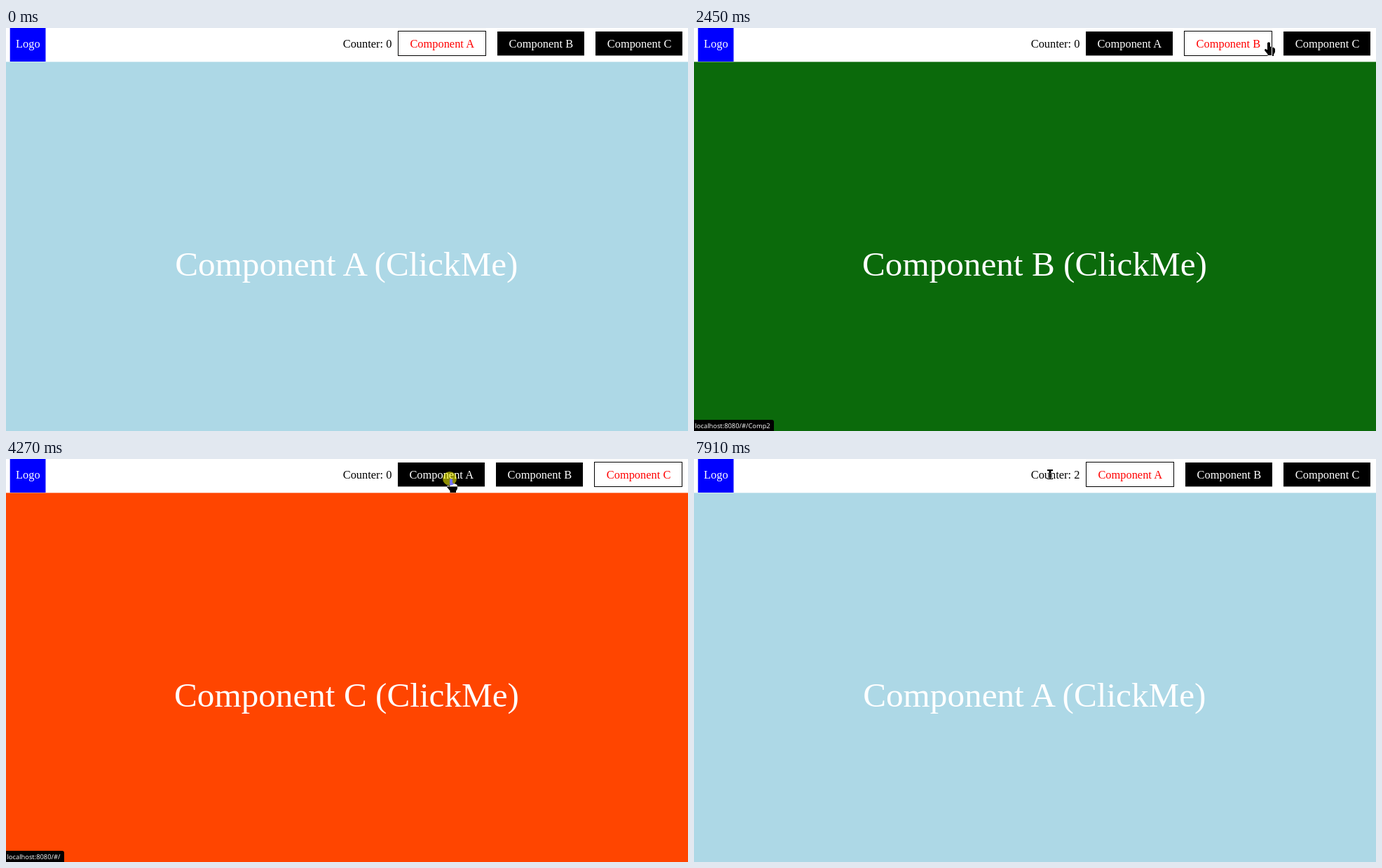
An HTML page with a canvas that plays this animation: 973 by 576 pixels, repeating every 8000 ms.

```html
<!DOCTYPE html>
<html lang="en">
<head>
<meta charset="utf-8">
<title>Component tabs</title>
<style>
  html, body { margin: 0; height: 100%; overflow: hidden; background: #fff; }
  canvas { display: block; }
</style>
</head>
<body>
<canvas id="stage" width="973" height="576"></canvas>
<script>
const ctx = document.getElementById('stage').getContext('2d');
const LOOP = 8000, FADE = 500, EM = 16.4, NAV = 48.4;
const TAB = { left: 559, width: 124, gap: 16.2 };
const SERIF = '"Liberation Serif", "Times New Roman", serif';
const SANS = '"Open Sans", "Noto Sans", sans-serif';
const colors = { A: '#add8e6', B: '#006400', C: '#ff4500' };

// Pointer moves; "dip" bends the way downwards, "link" is the address hovered on arrival.
const moves = [
  { from: 520, to: 820, x: 644, y: 25 },
  { from: 1020, to: 1520, x: 729, y: 21, link: 'Comp2' },
  { from: 2120, to: 2740, x: 895, y: 20, link: 'Comp3' },
  { from: 3110, to: 3660, x: 635, y: 28, link: '', dip: 50 },
  { from: 4450, to: 5070, x: 440, y: 335 },
  { from: 5620, to: 6090, x: 571, y: 19 },
  { from: 6090, to: 6590, x: 547, y: 22 }
];
const clicks = [
  { on: 'B', down: 1920, up: 2080 },
  { on: 'C', down: 3050, up: 3102 },
  { on: 'A', down: 4270, up: 4400 },
  { on: 'title', down: 5270, up: 5360 },
  { on: 'title', down: 5480, up: 5560 },
  { on: 'counter', down: 6890, up: 6990 }
];
const sway = { from: 7040, to: 7910, turns: 1.75, width: 39 };

const shapes = {
  arrow: new Path2D('M0 0V14L3.5 10.8L6 16.5L8.4 15.5L6 10H10.5Z'),
  hand: new Path2D('M-2 1.5Q0-1.2 2 1.5V6.5L7 8Q9 8.5 9 10.5V14Q8.5 16 7 17.5V20H-1.5V17.5L-6 12Q-6 9.5-4 10L-2 11.5Z'),
  beam: new Path2D('M-4-7H4V-5H1.5V5H4V7H-4V5H-1.5V-5H-4Z')
};

const progress = (t, { from, to }) => Math.min(1, Math.max(0, (t - from) / (to - from)));
const smooth = k => k * k * (3 - 2 * k);

// CSS "ease", cubic-bezier(.25, .1, .25, 1)
function ease(x) {
  if (x >= 1) return 1;
  const bezier = (a, b, u) => 3 * a * u * (1 - u) ** 2 + 3 * b * u * u * (1 - u) + u ** 3;
  let low = 0, high = 1;
  for (let i = 0; i < 20; i++) {
    const mid = (low + high) / 2;
    if (bezier(.25, .25, mid) < x) low = mid; else high = mid;
  }
  return bezier(.1, 1, low);
}

// Everything the page shows follows from the clicks made and the links reached.
function stateAt(t) {
  const released = clicks.filter(c => c.up <= t);
  const pressed = clicks.filter(c => c.down <= t);
  const tab = released.filter(c => c.on in colors).pop() || { on: 'A', up: -FADE };
  const arrived = moves.filter(m => m.to <= t).pop();
  return {
    letter: tab.on,
    opacity: ease((t - tab.up) / FADE),
    count: released.filter(c => c.on === 'title').length,
    selected: pressed.length === 5,
    link: arrived?.link,
    holding: pressed.length > released.length
  };
}

function rect(x, y, w, h, color) {
  ctx.fillStyle = color;
  ctx.fillRect(x, y, w, h);
}

function text(str, x, y, size, color, family = SERIF) {
  ctx.font = `${size}px ${family}`;
  ctx.fillStyle = color;
  ctx.fillText(str, x, y);
}

// The letter A sits slightly closer to the word before it.
function title(letter, x, y, size, color, suffix) {
  const letterX = x + size * (letter === 'A' ? 4.862 : 4.917);
  text('Component', x, y, size, color);
  text(letter, letterX, y, size, color);
  if (suffix) text(suffix, letterX + size * .917, y, size, color);
}

function drawNav({ letter: active, count }) {
  rect(5.7, 0, 50.8, 48, '#00f');
  text('Logo', 14, 28, EM, '#fff');
  text('Counter: ' + count, 480.7, 28, EM, '#000');
  let x = TAB.left;
  for (const letter of 'ABC') {
    const border = letter === active ? 1 : 0;
    const width = TAB.width + 2 * border;
    const left = Math.round(x), right = Math.round(x + width);
    rect(left, 5 - border, right - left, 34.4 + 1.6 * border, '#000');
    if (border) rect(left + 1, 5, right - left - 2, 34, '#fff');
    title(letter, x + EM + border, 28, EM, border ? '#f00' : '#fff');
    x += width + TAB.gap;
  }
}

function drawPage({ letter, opacity, selected }) {
  ctx.globalAlpha = opacity;
  rect(0, NAV, 973, 576 - NAV, colors[letter]);
  ctx.globalAlpha = 1;
  if (selected) rect(241, 310, 239, 56.5, '#2389ff');
  title(letter, letter === 'A' ? 241.2 : 240, 354, EM * 3, '#fff', '(ClickMe)');
}

function drawStatus({ link }) {
  if (link === undefined) return;
  ctx.fillStyle = '#000';
  ctx.beginPath();
  ctx.roundRect(0, 560, link ? 114 : 83, 16, [0, 3, 0, 0]);
  ctx.fill();
  text('localhost:8080/#/' + link, 1.5, 572, 9.35, '#fff', SANS);
}

function pointerAt(t) {
  let x = 766, y = 228;
  for (const move of moves) {
    const k = smooth(progress(t, move));
    x += (move.x - x) * k;
    y += (move.y - y) * k + 4 * k * (1 - k) * (move.dip || 0);
  }
  x += sway.width * (Math.cos(progress(t, sway) * sway.turns * 2 * Math.PI) - 1);
  return [x, y];
}

function pointerKind(x, y) {
  if (y > 4 && y < 40 && x >= TAB.left) return 'hand';
  const overCounter = y > 12 && y < 33 && x > 465;
  const overTitle = y > 310 && y < 366 && x > 241 && x < 730;
  return overCounter || overTitle ? 'beam' : 'arrow';
}

function drawPointer(t, { holding }) {
  if (t < moves[0].from) return;
  const [x, y] = pointerAt(t);
  ctx.save();
  ctx.translate(Math.round(x), Math.round(y));
  if (holding) {
    ctx.fillStyle = 'rgba(255, 255, 0, .55)';
    ctx.beginPath();
    ctx.arc(-2, 0, 10, 0, Math.PI * 2);
    ctx.fill();
  }
  // The pointer inverts whatever lies beneath it.
  ctx.globalCompositeOperation = 'difference';
  ctx.fillStyle = '#fff';
  ctx.fill(shapes[pointerKind(x, y)]);
  ctx.restore();
}

function draw(t) {
  const state = stateAt(t);
  rect(0, 0, 973, 576, '#fff');
  drawPage(state);
  drawNav(state);
  drawStatus(state);
  drawPointer(t, state);
}

ctx.fontKerning = 'none';
const begin = performance.now();
function tick() {
  draw((performance.now() - begin) % LOOP);
  requestAnimationFrame(tick);
}
tick();
</script>
</body>
</html>
```
